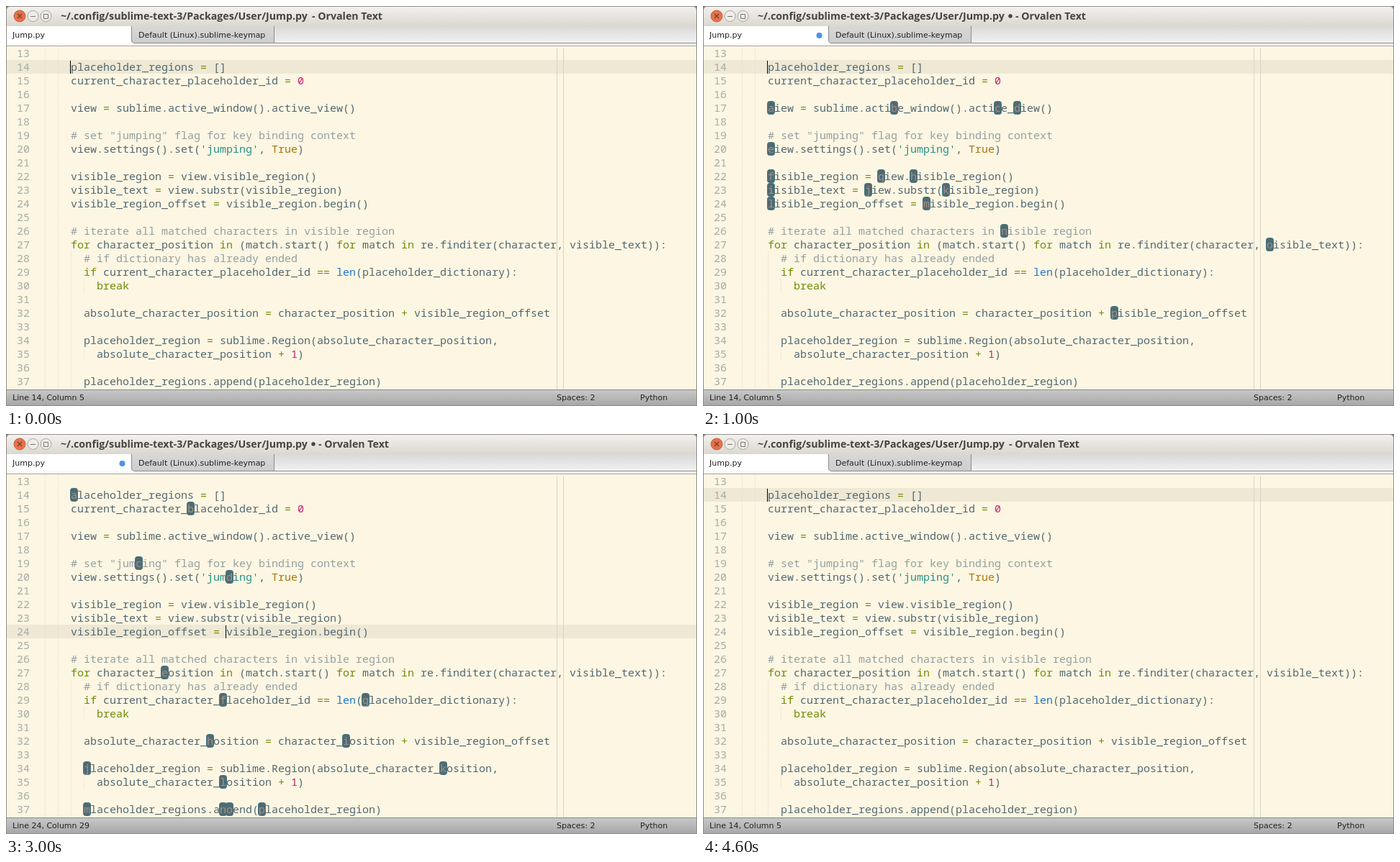
An HTML page that plays this animation: 960x556 px, repeating every 5000 ms.

```html
<!DOCTYPE html>
<html lang="en">
<head>
<meta charset="utf-8">
<title>Jump plugin demo</title>
<style>
  html, body { margin: 0; width: 100%; height: 100%; overflow: hidden; background: #77756f; }
  svg { display: block; width: 960px; height: 556px; }
  text { white-space: pre; }
  .ui { font: 11px "DejaVu Sans", sans-serif; fill: #222; }
  .title { font: 700 14.2px "Open Sans", "Noto Sans", sans-serif; fill: #47443e; }
  .code { font: 15px "Noto Sans Mono", "DejaVu Sans Mono", monospace; fill: #536871; font-variant-ligatures: none; }
  .number { fill: #a6aca5; }
  .comment { fill: #94a0a0; }
  .string { fill: #259286; }
  .constant { fill: #a57706; }
  .digit { fill: #c61c6f; }
  .keyword { fill: #738a05; }
  .builtin { fill: #2176c7; }
  .label { fill: #a0938b; }
</style>
</head>
<body>
<svg viewBox="0 0 960 556">
  <defs>
    <linearGradient id="titleBar" x2="0" y2="1">
      <stop stop-color="#f3f1ee"/><stop offset="1" stop-color="#dbd7d0"/>
    </linearGradient>
    <linearGradient id="tabBar" x2="0" y2="1">
      <stop stop-color="#d9d9d9"/><stop offset="1" stop-color="#f1f1f1"/>
    </linearGradient>
    <linearGradient id="idleTab" x2="0" y2="1">
      <stop stop-color="#d8d8d8"/><stop offset="1" stop-color="#cdcdcd"/>
    </linearGradient>
    <linearGradient id="statusBar" x2="0" y2="1">
      <stop stop-color="#c9c9c9"/><stop offset="1" stop-color="#a8a8a8"/>
    </linearGradient>
  </defs>

  <path d="M0 556V5Q0 0 5 0H955Q960 0 960 5V556Z" fill="#918e87"/>
  <path d="M1 28V6Q1 1 6 1H954Q959 1 959 6V28Z" fill="url(#titleBar)"/>
  <circle cx="19" cy="14" r="8" fill="#e96f49" stroke="#bd6748"/>
  <path d="M16 11l6 6m0-6l-6 6" stroke="#70442f" stroke-width="1.4"/>
  <g fill="#efede9" stroke="#aaa59c">
    <circle cx="37.5" cy="14" r="7.5"/>
    <circle cx="55.5" cy="14" r="7.5"/>
    <path d="M34 14.5h7M52.5 11.5h6v6h-6z" fill="none" stroke="#77736b"/>
  </g>
  <text class="title" x="76" y="19">~/.config/sublime-text-3/Packages/User/Jump.py</text>
  <circle id="titleDot" cx="427" cy="14" r="2.7" fill="#47443e"/>
  <text class="title" id="appName" y="19">- Orvalen Text</text>

  <rect x="1" y="28" width="958" height="28" fill="#fff"/>
  <rect x="174" y="28" width="785" height="23" fill="url(#tabBar)"/>
  <path d="M174 28H373V51H178Q174 51 174 47Z" fill="url(#idleTab)"/>
  <path d="M174.5 28V47Q174.5 51.5 179 51.5H959M372.5 28V51" fill="none" stroke="#8c8c8c"/>
  <rect x="1" y="52" width="958" height="3" fill="#f8f8f8"/>
  <rect x="1" y="55" width="958" height="1" fill="#a5a5a5"/>
  <text class="ui" x="9" y="44">Jump.py</text>
  <circle id="tabDot" cx="161.5" cy="41" r="4" fill="#4e94df"/>
  <text class="ui" x="184" y="44">Default (Linux).sublime-keymap</text>

  <rect x="1" y="56" width="958" height="477" fill="#fdf6e3"/>
  <rect id="activeLine" x="1" width="958" height="19" fill="#eee8d5"/>
  <path id="guides" stroke="#e5dfcc" stroke-dasharray="1 1"/>
  <g id="code" class="code"></g>
  <path d="M765.5 58V533M774.5 58V533" stroke="#d8d3c4"/>
  <rect id="caret" width="1" height="18" fill="#000"/>

  <rect x="1" y="533" width="958" height="22" fill="url(#statusBar)"/>
  <path d="M1 533.5H959" stroke="#8b8b8b"/>
  <text class="ui" id="position" x="9" y="548"></text>
  <text class="ui" x="765" y="548">Spaces: 2</text>
  <text class="ui" x="881" y="548">Python</text>
</svg>
<script>
const FIRST_LINE = 13, LEFT = 54, CHAR = 9, ROW = 19, TOP = 56;
const lines = `
    placeholder_regions = []
    current_character_placeholder_id = 0

    view = sublime.active_window().active_view()

    # set "jumping" flag for key binding context
    view.settings().set('jumping', True)

    visible_region = view.visible_region()
    visible_text = view.substr(visible_region)
    visible_region_offset = visible_region.begin()

    # iterate all matched characters in visible region
    for character_position in (match.start() for match in re.finditer(character, visible_text)):
      # if dictionary has already ended
      if current_character_placeholder_id == len(placeholder_dictionary):
        break

    absolute_character_position = character_position + visible_region_offset

      placeholder_region = sublime.Region(absolute_character_position,
        absolute_character_position + 1)

      placeholder_regions.append(placeholder_region)`
  .replace("    absolute_character_position = ", "      absolute_character_position = ")
  .split("\n");

const steps = [
  { line: 14, column: 5 },
  { line: 14, column: 5, target: "v" },
  { line: 24, column: 29 },
  { line: 24, column: 29, target: "p" },
  { line: 14, column: 5 },
];
const STEP_MS = 1000;

const tokenTypes = [
  ["comment", /^#/], ["string", /^'/], ["constant", /^True$/], ["digit", /^\d+$/],
  ["builtin", /^len$/], ["keyword", /^(for|in|if|break|[=+]+)$/],
];
const tokenPattern = /#.*|'[^']*'|\w+|[=+]+|[^\w\s'#=+]+/g;

const byId = id => document.getElementById(id);
const lineTop = number => TOP + (number - FIRST_LINE) * ROW;
const columnX = column => LEFT + column * CHAR;

function textAt(x, y, content, type = "") {
  return `<text class="${type}" x="${x}" y="${y}">${content}</text>`;
}

function renderCode(target) {
  let label = 97, markup = "";
  lines.forEach((line, index) => {
    const number = FIRST_LINE + index, top = lineTop(number), base = top + 15;
    markup += textAt(15, base, number, "number");
    for (const { 0: token, index: start } of line.matchAll(tokenPattern)) {
      const type = tokenTypes.find(([, pattern]) => pattern.test(token))?.[0];
      const visible = target ? token.replaceAll(target, "\u00a0") : token;
      markup += textAt(columnX(start), base, visible, type);
    }
    if (!target) return;
    [...line].forEach((char, column) => {
      if (char !== target) return;
      const x = columnX(column);
      markup += `<rect x="${x - 0.5}" y="${top + 0.5}" width="10" height="18" rx="3" fill="#506a72" stroke="#437780"/>`;
      markup += textAt(x, base, String.fromCharCode(label++), "label");
    });
  });
  byId("code").innerHTML = markup;
}

function guide(column, from, to) {
  return `M${columnX(column) + 0.5} ${lineTop(from)}V${lineTop(to + 1)}`;
}
byId("guides").setAttribute("d",
  guide(0, 13, 37) + guide(2, 13, 37) + guide(4, 28, 37) + guide(6, 30, 30) + guide(6, 35, 35));

function show({ line, column, target }) {
  const top = lineTop(line), dot = target ? "visible" : "hidden";
  renderCode(target);
  byId("activeLine").setAttribute("y", top);
  byId("caret").setAttribute("x", columnX(column - 1) - 1);
  byId("caret").setAttribute("y", top + 1);
  byId("titleDot").setAttribute("visibility", dot);
  byId("tabDot").setAttribute("visibility", dot);
  byId("appName").setAttribute("x", target ? 434 : 425);
  byId("position").textContent = `Line ${line}, Column ${column}`;
}

// With no target the caret line stays lit only for its own step.
let current = -1;
const startTime = performance.now();
function tick() {
  const step = Math.floor((performance.now() - startTime) / STEP_MS) % steps.length;
  if (step !== current) show(steps[current = step]);
  requestAnimationFrame(tick);
}
tick();
</script>
</body>
</html>
```
